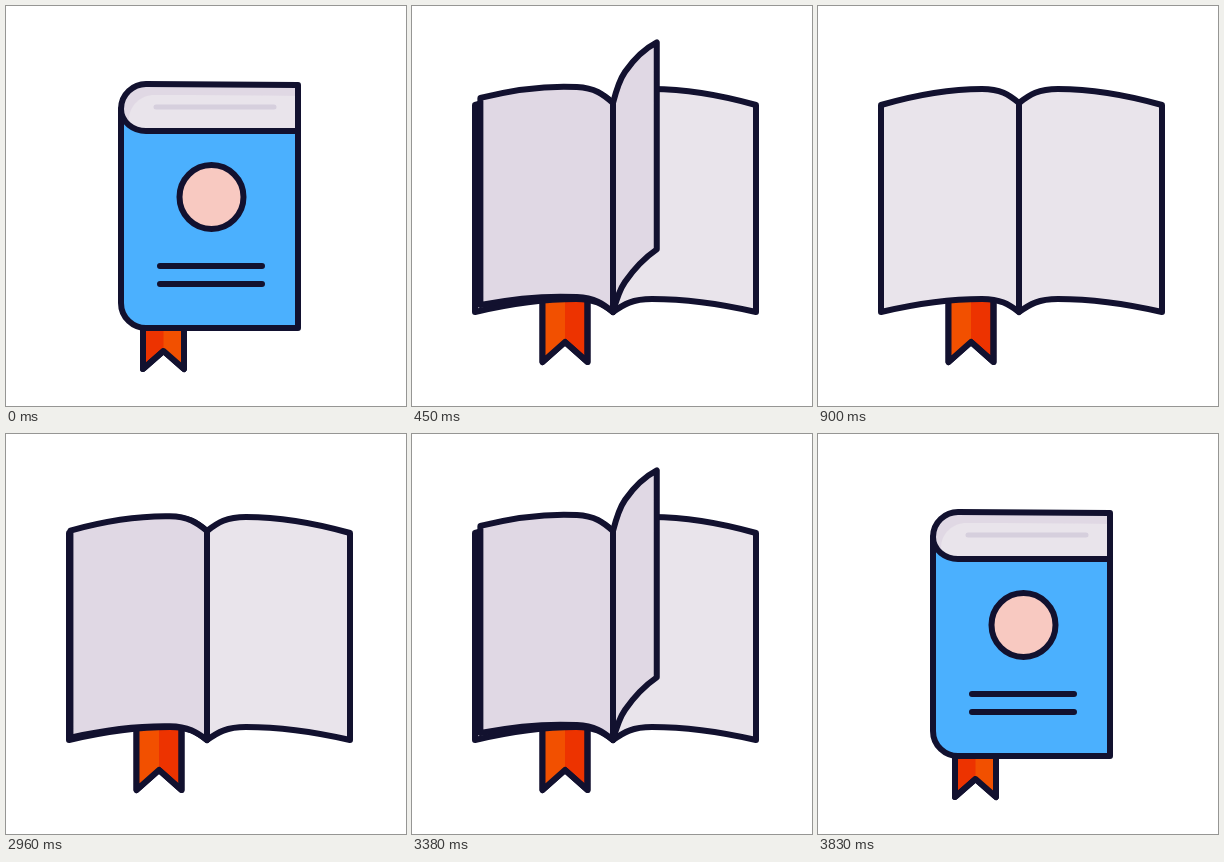
An HTML page that plays this animation: 400x400 px, repeating every 4.86 s.

```html
<!DOCTYPE html>
<html lang="en">
<head>
<meta charset="utf-8">
<title>Book</title>
<style>
html, body { margin: 0; width: 100%; height: 100%; overflow: hidden; background: #fff; }
svg { display: block; width: 100vw; height: 100vh; }
.ink { stroke: #12112f; stroke-width: 6; stroke-linejoin: round; stroke-linecap: round; }
</style>
</head>
<body>
<svg id="book" viewBox="0 0 400 400">
  <clipPath id="clip"><path id="clipShape"/></clipPath>
  <path id="ribbon" class="ink" fill="#ed3300"/>
  <path id="ribbonHalf" fill="#f25000"/>
  <path id="ribbonLine" class="ink" fill="none"/>
  <path id="back" fill="#e0d8e4"/>
  <g clip-path="url(#clip)"><path id="inner" fill="#e9e4eb"/></g>
  <path id="mark" fill="none" stroke="#d6cfdd" stroke-width="5" stroke-linecap="round"/>
  <path id="backLine" class="ink" fill="none"/>
  <g id="front">
    <path id="cover" class="ink"/>
    <g id="art">
      <circle id="disc" class="ink" r="32" fill="#f8c9c1"/>
      <path id="lines" class="ink" fill="none"/>
    </g>
  </g>
  <g id="pages" class="ink" fill="#e0d8e4">
    <path id="page0"/><path id="page1"/><path id="page2"/>
  </g>
</svg>
<script>
const LOOP = 4860, STEP = 30, OPEN_END = 900, CLOSE_START = 2960, CLOSE_END = 3830;
const COVER_TIME = 360;
const TURNS = [{ start: 164, time: 314 }, { start: 292, time: 394 }, { start: 494, time: 394 }];

// Each leaf is given at its spine, its ridge and its outer edge
const OPEN_Y = { top: [97, 83, 99], bottom: [306, 293, 306] };
const CLOSED_X = [115, 140, 292];
const BACK = {
  closed: { x: CLOSED_X, top: [103, 78, 79], bottom: [280, 280, 280] },
  open: { x: [201, 240, 344], ...OPEN_Y }
};
const COVER = {
  closed: { x: CLOSED_X, top: [103, 125, 125], bottom: [297, 322, 322] },
  open: { x: [201, 164, 63], ...OPEN_Y }
};

const $ = id => document.getElementById(id);
const set = (id, attrs) => {
  for (const name in attrs) $(id).setAttribute(name, attrs[name]);
};
const lerp = (a, b, p) => a + (b - a) * p;
const arc = p => Math.sin(Math.PI * p);

// Bezier points from spine over ridge to edge; lean tilts the start at the spine
function curve(x, y, lean) {
  const [sx, mx, ex] = x, [sy, my, ey] = y;
  return [
    [sx, sy],
    [lerp(sx, mx, lean), lerp(sy, my, 0.6)],
    [lerp(sx, mx, 0.5), my],
    [mx, my],
    [lerp(mx, ex, 0.34), my],
    [lerp(mx, ex, 0.67), lerp(my, ey, 0.4)],
    [ex, ey]
  ];
}

function leaf({ closed, open }, p, dip = 0) {
  const blend = key => closed[key].map((v, i) =>
    lerp(v, open[key][i], p) + (key !== 'x' && i ? dip : 0));
  const x = blend('x'), lean = 0.28 * p;
  return [...curve(x, blend('top'), lean), ...curve(x, blend('bottom'), lean).reverse()];
}

function outline(points) {
  const q = points.map(v => v.map(n => n.toFixed(2)).join(' '));
  return `M${q[0]}C${q.slice(1, 7).join(' ')}L${q[7]}C${q.slice(8).join(' ')}Z`;
}

// Swing a leaf around its spine, raising the outer edge on the way
function turn(points, s) {
  const k = Math.cos(Math.PI * s);
  const lift = 64.5 * arc(s ** 0.9) ** 1.6;
  const hinge = points[0][0], width = points[6][0] - hinge;
  const reach = k < 0 ? k * 0.965 : k;
  return points.map(([x, y]) => {
    const d = x - hinge;
    return [hinge + d * reach, y - lift * d / width];
  });
}

function drawRibbon(p) {
  const mid = lerp(157.5, 153, p) + 11 * arc(p);
  const half = lerp(20.5, -22.5, p) + 6 * arc(p);
  const top = lerp(315, 288, p), end = lerp(363, 356, p), notch = lerp(345, 336, p);
  const a = mid - half, b = mid + half;
  const d = `M${a} ${top}V${end}L${mid} ${notch}L${b} ${end}V${top}Z`;
  set('ribbon', { d });
  set('ribbonLine', { d });
  set('ribbonHalf', { d: `M${b} ${top}V${end}L${mid} ${notch}V${top}Z` });
}

function drawCover(p) {
  const points = leaf(COVER, p, 15 * arc(p));
  const facing = points[6][0] > points[0][0];
  set('cover', { d: outline(points), fill: facing ? '#4bb0fe' : '#e9e4eb' });
  set('art', { visibility: facing ? 'visible' : 'hidden' });
  $('book').insertBefore($('pages'), facing ? $('front') : null);

  const squash = Math.max(0.01, 1 - 1.8 * p);
  set('disc', {
    transform: `translate(${205.5 - 83 * p} ${191 - 12 * p}) scale(${squash} 1)`
  });
  const line = y =>
    `M${154 + 13 * p} ${y - 21 * p}L${256 - 176 * p} ${y + 9 * p}`;
  set('lines', { d: line(260) + line(278), style: `stroke-width:${6 - 6 * p}` });
}

function drawPages(base, u) {
  TURNS.forEach(({ start, time }, i) => {
    const s = (u - start) / time;
    set('page' + i, {
      d: s > 0 && s < 1 ? outline(turn(base, s)) : '',
      'fill-opacity': Math.min(1, Math.max(0, 5 * s))
    });
  });
}

function draw(u) {
  const p = (1 - Math.cos(Math.PI * Math.min(1, u / COVER_TIME))) / 2;
  const back = leaf(BACK, p), d = outline(back);
  for (const id of ['clipShape', 'back', 'backLine', 'inner']) set(id, { d });
  set('inner', { transform: `translate(${16 * arc((1 + 5 * p) / 6)} ${11 * (1 - p * p)})` });
  set('mark', { d: `M${150 + 86 * p} 101H${268 + 52 * p}`, opacity: Math.max(0, 1 - 3 * p) });
  drawRibbon(p);
  drawCover(p);
  drawPages(back, u);
}

function progress(t) {
  const snap = x => Math.floor(x / STEP) * STEP;
  if (t < OPEN_END) return snap(t);
  if (t < CLOSE_START) return OPEN_END;
  if (t < CLOSE_END) return CLOSE_END - CLOSE_START - snap(t - CLOSE_START);
  return 0;
}

const begin = performance.now();
function tick() {
  draw(progress((performance.now() - begin) % LOOP));
  requestAnimationFrame(tick);
}
tick();
</script>
</body>
</html>
```
